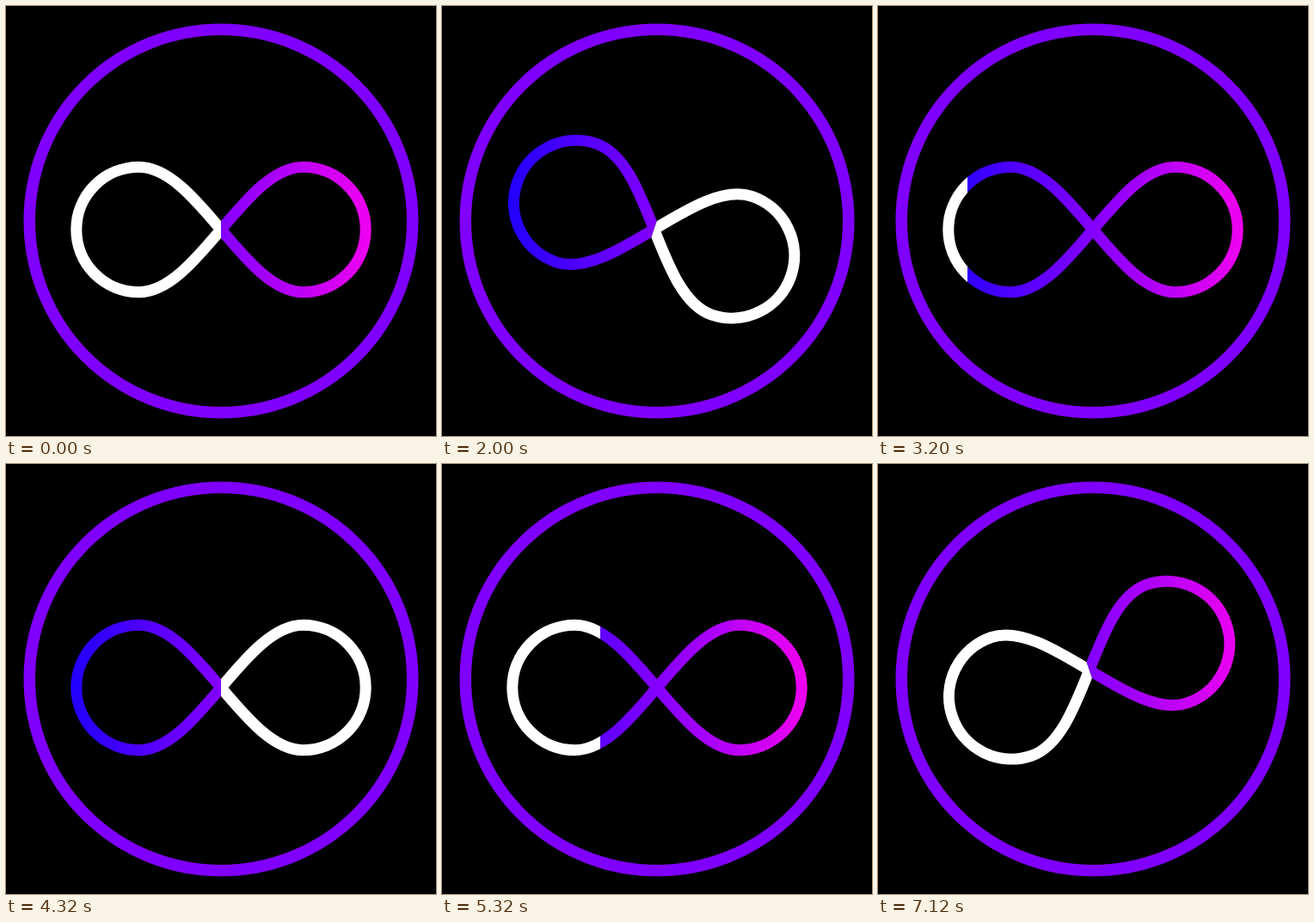
Recreate the animation shown at these times as an HTML page with a canvas. Size 500 by 500 pixels, loop 7.2 s.

```html
<!DOCTYPE html>
<html lang="en">
<head>
<meta charset="utf-8">
<title>Infinity loop</title>
<style>
  html, body { margin: 0; width: 100%; height: 100%; overflow: hidden; background: #000; }
  canvas { display: block; width: 500px; height: 500px; }
</style>
</head>
<body>
<canvas id="stage" width="500" height="500"></canvas>
<script>
const ctx = document.getElementById('stage').getContext('2d');
const LOOP = 7200;
const CYCLE = 24; // steps: 10 reveal, 10 cover, 4 turn
const REACH = 175; // half the width of the shape
const PIVOT = -0.5;

// Coordinates are relative to the stage centre.
const SHAPE_Y = 10, LOBE_X = 95.5, LOBE_R = 72.7, PULL = 68;

function infinityPath() {
  const p = new Path2D();
  const top = SHAPE_Y - LOBE_R, bottom = SHAPE_Y + LOBE_R;
  p.moveTo(-LOBE_X, top);
  p.bezierCurveTo(-LOBE_X + PULL, top, LOBE_X - PULL, bottom, LOBE_X, bottom);
  p.arc(LOBE_X, SHAPE_Y, LOBE_R, Math.PI / 2, -Math.PI / 2, true);
  p.bezierCurveTo(LOBE_X - PULL, top, -LOBE_X + PULL, bottom, -LOBE_X, bottom);
  p.arc(-LOBE_X, SHAPE_Y, LOBE_R, Math.PI / 2, Math.PI * 1.5);
  p.closePath();
  return p;
}
const shape = infinityPath();

const smooth = u => u * u * (3 - 2 * u);
const smoothOut = u => 2 * smooth((1 + u) / 2) - 1;

// Steps alternate between 120 and 80 ms.
function stepAt(t) {
  return 2 * Math.floor(t / 200) + (t % 200 >= 120 ? 1 : 0);
}

function pose(step) {
  const i = step % CYCLE;
  if (i < 10) return { split: REACH * (smoothOut(1 - i / 9) - 1), whiteLeft: true, angle: 0 };
  if (i < 20) return { split: REACH * (1 - smoothOut((i - 10) / 9)), whiteLeft: false, angle: 0 };
  return { split: 0, whiteLeft: false, angle: Math.PI * smooth((i - 19) / 5) };
}

// The gradient stays level on the stage while the shape turns.
function levelGradient(angle) {
  const x = REACH * Math.cos(angle), y = -REACH * Math.sin(angle);
  const g = ctx.createLinearGradient(-x, -y, x, y);
  g.addColorStop(0, '#2000ff');
  g.addColorStop(0.5, '#8400ff');
  g.addColorStop(1, '#f000f0');
  return g;
}

function strokeBetween(left, right, style) {
  ctx.save();
  ctx.beginPath();
  ctx.rect(left, -250, right - left, 500);
  ctx.clip();
  ctx.strokeStyle = style;
  ctx.lineWidth = 13;
  ctx.stroke(shape);
  ctx.restore();
}

function draw(t) {
  const { split, whiteLeft, angle } = pose(stepAt(t));
  const edge = Math.abs(split) < REACH ? Math.round(split) : Math.sign(split) * 250;
  const tint = levelGradient(angle);

  ctx.setTransform(1, 0, 0, 1, 0, 0);
  ctx.fillStyle = '#000';
  ctx.fillRect(0, 0, 500, 500);

  ctx.translate(250, 250);
  ctx.strokeStyle = '#8000ff';
  ctx.lineWidth = 13.5;
  ctx.beginPath();
  ctx.arc(0, 0, 222.75, 0, Math.PI * 2);
  ctx.stroke();

  ctx.translate(PIVOT, PIVOT);
  ctx.rotate(angle);
  ctx.translate(-PIVOT, -PIVOT);
  strokeBetween(-250, edge, whiteLeft ? '#fff' : tint);
  strokeBetween(edge, 250, whiteLeft ? tint : '#fff');
}

const start = performance.now();
function tick() {
  draw((performance.now() - start) % LOOP);
  requestAnimationFrame(tick);
}
tick();
</script>
</body>
</html>
```
